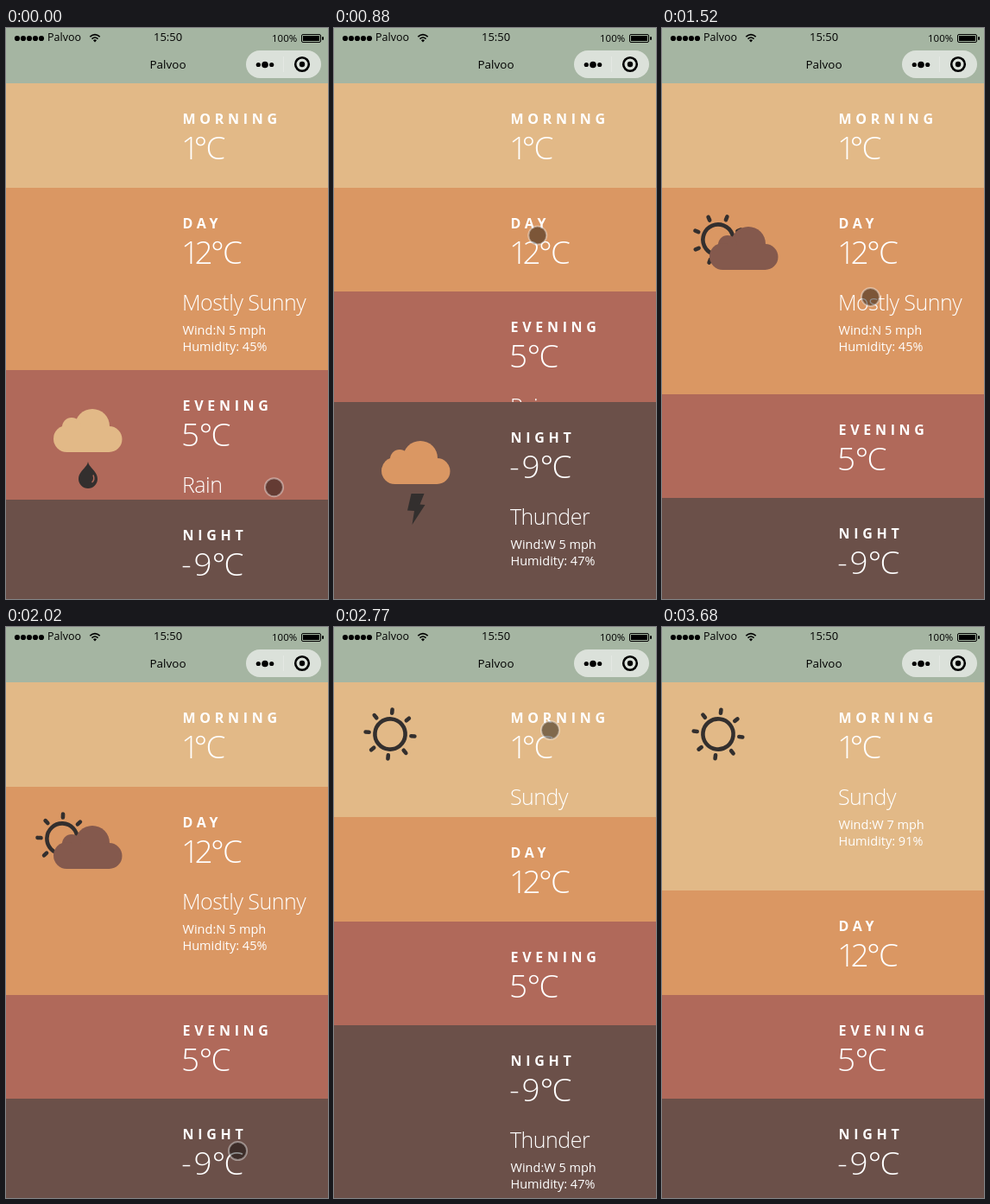
Write an HTML page that moves like this. It is 373x661 px and loops after 3780 ms.

```html
<!DOCTYPE html>
<html lang="en">
<head>
<meta charset="utf-8">
<title>Weather</title>
<style>
  html, body { margin: 0; width: 100%; height: 100%; overflow: hidden; }
  svg { display: block; font-family: "Open Sans", "Noto Sans", sans-serif; }
  .day-part text { fill: #fff; }
  .title { font-size: 16px; font-weight: 700; letter-spacing: 4.7px; }
  .temp { font-size: 37px; font-weight: 300; }
  .unit { letter-spacing: -1.8px; }
  .sky { font-size: 25px; font-weight: 300; letter-spacing: -.5px; }
  .info { font-size: 14.5px; font-weight: 500; }
</style>
</head>
<body>
<svg id="stage" width="373" height="661" viewBox="0 0 373 661">
  <g id="parts"></g>
  <g id="header">
    <rect width="373" height="64" fill="#a5b5a2"/>
    <g id="signal"></g>
    <text x="48" y="15" font-size="12.5">Palvoo</text>
    <path d="M97.3 10.2Q103 5 108.7 10.2M99.5 12.6Q103 9.4 106.5 12.6" fill="none" stroke="#000" stroke-width="1.6"/>
    <path d="M101 14.2Q103 12.5 105 14.2L103 16.4Z"/>
    <text x="171" y="15" font-size="13">15:50</text>
    <text x="308" y="16" font-size="11.5">100%</text>
    <rect x="342.5" y="7.5" width="22" height="9" rx="1.5" fill="none" stroke="#000"/>
    <rect x="344" y="9" width="19" height="6"/>
    <rect x="366" y="10" width="2" height="4" rx="1"/>
    <text x="187.5" y="47" font-size="13.5" text-anchor="middle">Palvoo</text>
    <rect x="278" y="26" width="87" height="32" rx="16" fill="#fff" fill-opacity=".6"/>
    <path d="M321.5 33V51" stroke="#fff" stroke-opacity=".25"/>
    <circle cx="292.3" cy="42.5" r="2.6"/>
    <circle cx="300" cy="42.5" r="3.8"/>
    <circle cx="307.7" cy="42.5" r="2.6"/>
    <circle cx="343" cy="42" r="7.8" fill="none" stroke="#000" stroke-width="2.6"/>
    <circle cx="343" cy="42" r="3.2"/>
  </g>
  <circle id="pointer" r="10.5" transform="translate(.5 .5)" fill="#000" fill-opacity=".43" stroke="#fff" stroke-opacity=".4" stroke-width="2"/>
</svg>
<script>
const LOOP = 3780, TOP = 64, CLOSED = 120.6, EXTRA = 120.6, SLIDE = 500, SPIN = 7000;
const MORNING = 0, DAY = 1, EVENING = 2, NIGHT = 3;
const INK = '#332f2e';
const $ = id => document.getElementById(id);

const cloud = color => `<g fill="${color}"><circle cx="100" cy="65" r="20"/><circle cx="76" cy="66" r="11"/>
  <circle cx="70.5" cy="79.5" r="15.5"/><circle cx="119.5" cy="80" r="15"/><path d="M70 66H119V95H70Z"/></g>`;

const rays = [...Array(8).keys()]
  .map(i => `<path d="M0 -24.5V-28.5" transform="rotate(${i * 45})"/>`).join('');
const sun = `<g class="sun" fill="none" stroke="${INK}" stroke-width="4.6" stroke-linecap="round">
  <circle r="17.6"/>${rays}</g>`;

const drop = `<path d="M95 106C96 113 106 117 106 126A11 11 0 0 1 84 126C84 117 94 113 95 106Z" fill="${INK}"/>
  <path d="M101 121.5Q103.2 127 99.5 130" fill="none" stroke="#b0695a" stroke-width="1.5"/>`;

const bolt = `<path class="bolt" d="M89.5 106H104.5L99.5 118.5L105.5 119L90.5 142L93 126L85 125.5Z" fill="${INK}"/>`;

// track: spacing between the figures; unit: where the degree sign starts
const data = [
  { name: 'MORNING', color: '#e2b987', deg: '1', track: 0, unit: 217.5, sky: 'Sundy', wind: 'W 7', wet: 91, icon: sun },
  { name: 'DAY', color: '#da9763', deg: '12', track: -5.6, unit: 237, sky: 'Mostly Sunny', wind: 'N 5', wet: 45, icon: sun + cloud('#84594d') },
  { name: 'EVENING', color: '#b0695a', deg: '5', track: 0, unit: 223.5, sky: 'Rain', wind: 'W 12', wet: 45, icon: cloud('#e2b987') + drop },
  { name: 'NIGHT', color: '#6b5049', deg: '-9', track: 2.5, unit: 238.5, sky: 'Thunder', wind: 'W 5', wet: 47, icon: cloud('#da9763') + bolt }
];

$('parts').innerHTML = data.map(d => `<g class="day-part">
  <rect width="373" height="661" fill="${d.color}"/>
  <g class="icon">${d.icon}</g>
  <text class="title" x="204.5" y="47">${d.name}</text>
  <text class="temp" x="203" y="88" letter-spacing="${d.track}">${d.deg}<tspan class="unit" x="${d.unit}">°C</tspan></text>
  <text class="sky" x="204" y="142">${d.sky}</text>
  <text class="info" x="204.5" y="170">Wind:${d.wind} mph</text>
  <text class="info" x="204.5" y="189">Humidity: ${d.wet}%</text></g>`).join('');

$('signal').innerHTML = [13, 20, 27, 34, 41]
  .map(x => `<circle cx="${x}" cy="12" r="3.1"/>`).join('');

const parts = [...document.querySelectorAll('.day-part')].map(el => ({
  el,
  icon: el.querySelector('.icon'),
  sun: el.querySelector('.sun'),
  bolt: el.querySelector('.bolt')
}));

const taps = [
  { at: -89, from: DAY, to: EVENING },
  { at: 529, from: EVENING, to: NIGHT },
  { at: 1104, from: NIGHT, to: DAY },
  { at: 2142, from: DAY, to: NIGHT },
  { at: 2671, from: NIGHT, to: MORNING }
];

// time, x, y of the touch pointer
const path = [
  [0, 310, 531], [300, 302, 600], [480, 297, 614], [540, 295, 610], [610, 273, 455],
  [760, 245, 290], [1000, 231, 218], [1260, 231, 218], [1640, 248, 380], [1900, 266, 590],
  [2020, 268, 606], [2150, 272, 606], [2300, 278, 306], [2460, 262, 160], [2640, 250, 119],
  [2800, 250, 119], [3240, 300, 400], [3640, 360, 675]
];

// CSS "ease": cubic-bezier(.25, .1, .25, 1)
function ease(x) {
  if (x <= 0) return 0;
  if (x >= 1) return 1;
  const bez = (a, b, u) => 3 * a * u * (1 - u) ** 2 + 3 * b * u * u * (1 - u) + u ** 3;
  let lo = 0, hi = 1;
  for (let i = 0; i < 24; i++) {
    const mid = (lo + hi) / 2;
    if (bez(.25, .25, mid) < x) lo = mid; else hi = mid;
  }
  return bez(.1, 1, lo);
}

const slope = (i, k) => (path[i + 1][k] - path[i][k]) / (path[i + 1][0] - path[i][0]);

function tangent(i, k) {
  if (i === 0 || i === path.length - 1) return slope(i ? i - 1 : 0, k);
  const a = slope(i - 1, k), b = slope(i, k);
  return a * b <= 0 ? 0 : 2 * a * b / (a + b);
}

// Monotone cubic through the path points
function along(t, k) {
  const last = path.length - 1;
  if (t >= path[last][0]) return path[last][k];
  let i = 0;
  while (t >= path[i + 1][0]) i++;
  const h = path[i + 1][0] - path[i][0], u = (t - path[i][0]) / h, v = 1 - u;
  return path[i][k] * (1 + 2 * u) * v * v + path[i + 1][k] * u * u * (3 - 2 * u)
    + h * (tangent(i, k) * u * v * v - tangent(i + 1, k) * u * u * v);
}

function draw(t) {
  const tap = taps.filter(p => p.at <= t).pop();
  const since = t - tap.at, k = ease(since / SLIDE);
  let y = TOP;
  parts.forEach((p, i) => {
    p.el.setAttribute('transform', `translate(0 ${Math.round(y)})`);
    p.icon.setAttribute('visibility', i === tap.to ? 'visible' : 'hidden');
    if (p.sun) p.sun.setAttribute('transform', `translate(65 60) rotate(${since / SPIN * 360})`);
    if (p.bolt) {
      const f = Math.min(1, since / 110);
      p.bolt.setAttribute('opacity', f * f * (3 - 2 * f));
    }
    y += CLOSED + EXTRA * (i === tap.to ? k : i === tap.from ? 1 - k : 0);
  });
  $('pointer').setAttribute('cx', along(t, 1));
  $('pointer').setAttribute('cy', along(t, 2));
}

const start = performance.now();
function tick() {
  draw((performance.now() - start) % LOOP);
  requestAnimationFrame(tick);
}
draw(0);
requestAnimationFrame(tick);
</script>
</body>
</html>
```
